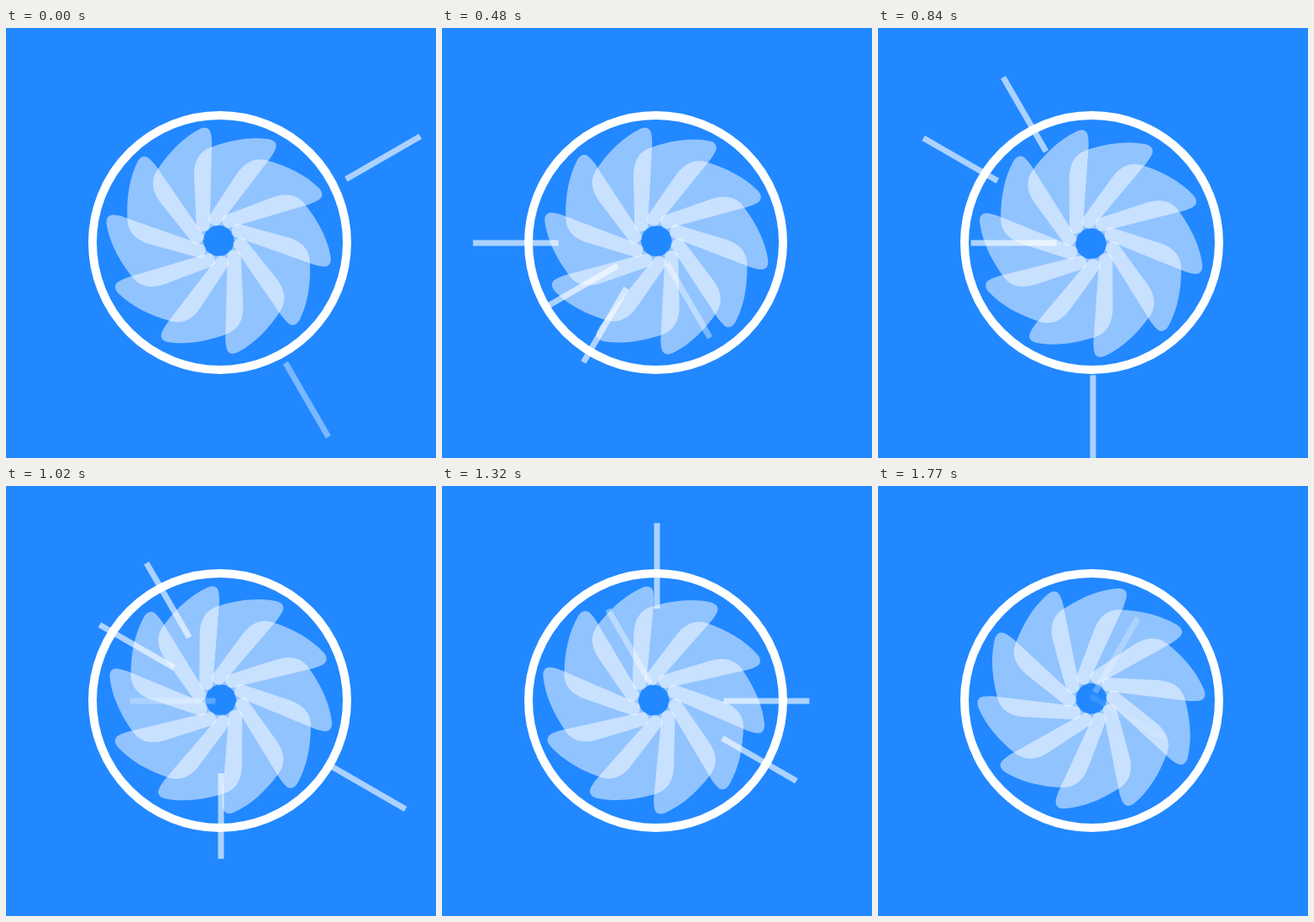
Animation, 512 px wide and 512 px high, one loop 1800 ms. Source, as an HTML page without scripts:

```html
<!DOCTYPE html>
<html lang="en">
<head>
<meta charset="utf-8">
<title>Fan</title>
<style>
/* One clock drives everything: 60 ticks of 30 ms. */
@property --t { syntax: "<number>"; inherits: true; initial-value: 0; }
@keyframes clock { from { --t: 0; } to { --t: 60; } }

html, body { margin: 0; width: 100%; height: 100%; overflow: hidden; background: #2288ff; }
svg {
  display: block; width: 100%; height: 100%;
  animation: clock 1.8s steps(60) -2ms infinite;
}
.fan { transform: translate(254px, 254.9px) rotate(calc(var(--t) * -17.91deg)); }
.blade { fill: #fff; fill-opacity: .5; }
.ring { fill: none; stroke: #fff; stroke-width: 10; }

/* a angle, s first tick, d life in ticks, r starting reach,
   y and e sideways offset at start and end, o peak opacity */
.ray {
  --y: 0; --e: 0; --o: .62;
  --q: calc(1 - (var(--t) - var(--s)) / var(--d));
  fill: none; stroke: #fff; stroke-width: 7;
  transform: rotate(calc(var(--a) * 1deg))
    translate(calc((87 + (var(--r) - 87) * var(--q)) * 1px),
              calc((var(--e) + (var(--y) - var(--e)) * var(--q)) * 1px));
  opacity: calc(min(var(--o), 2 * var(--q)) * clamp(0, (var(--t) - var(--s)) * 9 + 1, 1));
}
</style>
</head>
<body>
<svg viewBox="0 0 512 512">
  <defs>
    <path id="blade" class="blade" d="M-26.5-17.5L-29.3-78C-29.5-95-23-106-10-111
      C14-120 37-124 59-121C66-120 70-116 68-110C66.5-106 64-102 62-99L1.5-20
      A7.5 7.5 0 0 1-6-17.6L-16-11.5A7.5 7.5 0 0 1-26.5-17.5Z"/>
    <path id="line" d="M-102 0H0"/>
  </defs>

  <g class="fan">
    <g transform="translate(-.8 -1.6)">
      <use href="#blade"/>
      <use href="#blade" transform="rotate(36)"/>
      <use href="#blade" transform="rotate(72)"/>
      <use href="#blade" transform="rotate(108)"/>
      <use href="#blade" transform="rotate(144)"/>
      <use href="#blade" transform="rotate(180)"/>
      <use href="#blade" transform="rotate(216)"/>
      <use href="#blade" transform="rotate(252)"/>
      <use href="#blade" transform="rotate(288)"/>
      <use href="#blade" transform="rotate(324)"/>
    </g>
  </g>

  <g transform="translate(256 256)">
    <use href="#line" class="ray" style="--a:-30;--s:0;--d:10;--r:269;--y:8.6"/>
    <use href="#line" class="ray" style="--a:60;--s:0;--d:21;--r:264;--y:4.8;--e:.8;--o:.4"/>
    <use href="#line" class="ray" style="--a:120;--s:5;--d:19.5;--r:270;--y:9;--e:1.5"/>
    <use href="#line" class="ray" style="--a:150;--s:9;--d:11;--r:277"/>
    <use href="#line" class="ray" style="--a:180;--s:10;--d:27.5;--r:256"/>
    <use href="#line" class="ray" style="--a:240;--s:19;--d:30.8;--r:281;--y:7.3;--e:3"/>
    <use href="#line" class="ray" style="--a:210;--s:24;--d:17.5;--r:282;--y:8;--e:5"/>
    <use href="#line" class="ray" style="--a:90;--s:26;--d:16.5;--r:283"/>
    <use href="#line" class="ray" style="--a:30;--s:30;--d:30.5;--r:280;--y:2.5;--e:-4"/>
    <use href="#line" class="ray" style="--a:270;--s:38;--d:17.5;--r:277"/>
    <use href="#line" class="ray" style="--a:0;--s:39;--d:12.3;--r:246"/>
    <use href="#line" class="ray" style="--a:300;--s:50;--d:10.4;--r:274;--y:9;--e:-5"/>
  </g>

  <circle class="ring" cx="254.5" cy="255.5" r="151.5"/>
</svg>
</body>
</html>
```
